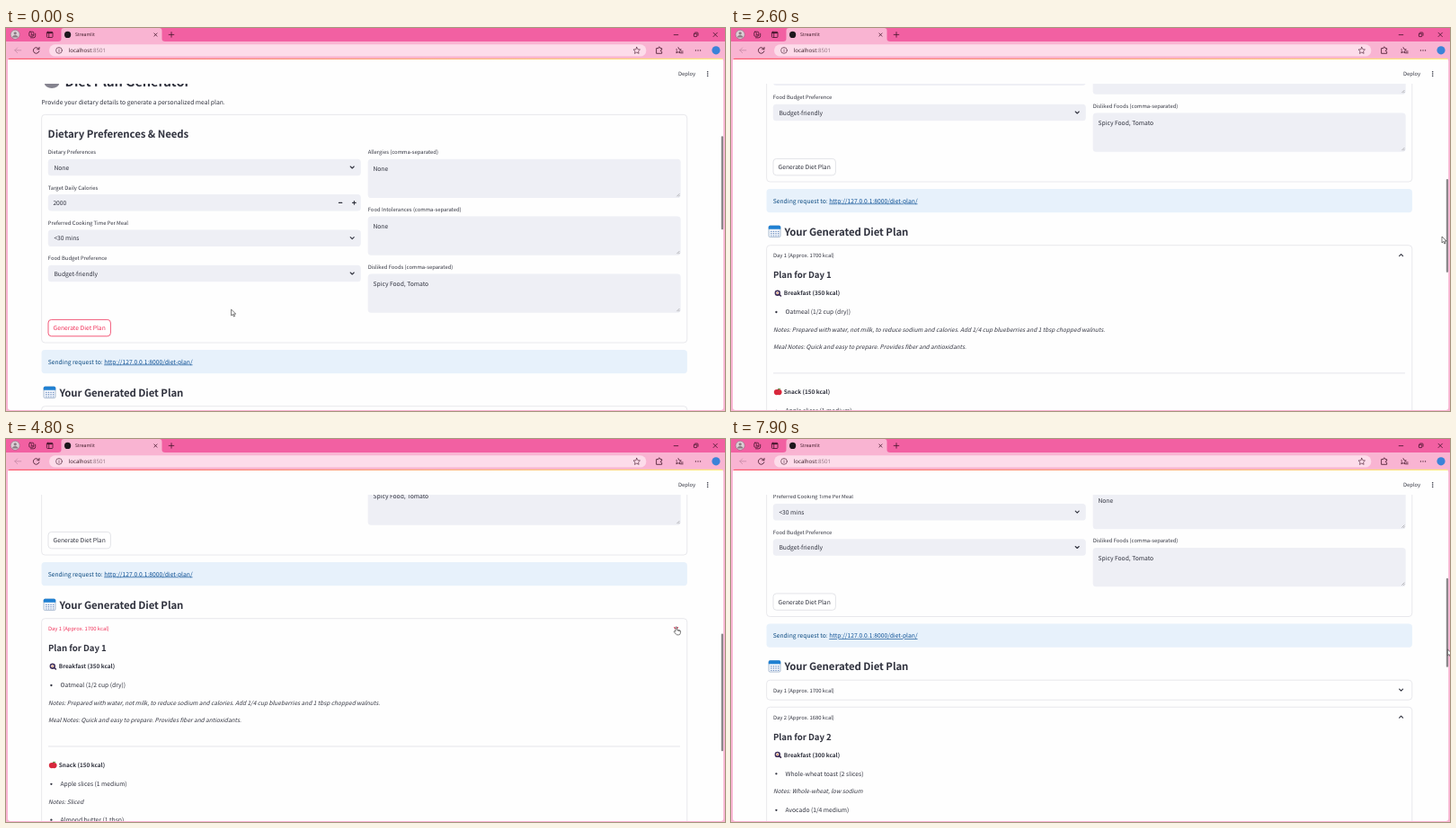
Animation of 800 by 426 pixels, one loop 8 s. Source, as an HTML page:

```html
<!DOCTYPE html>
<html lang="en">
<head>
<meta charset="utf-8">
<title>Diet plan</title>
<style>
html, body { margin: 0; width: 100%; height: 100%; overflow: hidden; background: #f9b4d2; }
svg { display: block; width: 800px; height: 426px; }
text { font: 6.72px "Noto Sans CJK JP", "Noto Sans CJK SC", "Noto Sans CJK KR", "Noto Sans CJK", "Noto Sans", sans-serif;
  fill: #31333f; text-rendering: geometricPrecision; white-space: pre; }
.small { font-size: 5.87px; }
.h2 { font-size: 14.6px; font-weight: 700; letter-spacing: -.08px; }
.h3 { font-size: 11.4px; font-weight: 700; letter-spacing: -.066px; }
.h4 { font-size: 9.65px; font-weight: 700; letter-spacing: -.05px; }
.strong { font-size: 6.45px; font-weight: 700; }
.note { font-size: 6.52px; font-style: italic; }
.info { fill: #0b4a80; }
.link { fill: #0b4f94; text-decoration: underline; }
.ui { font-family: "Open Sans", "Noto Sans", sans-serif; fill: #33121f; }
.line { fill: none; stroke: #31333f; stroke-width: 1.1; stroke-linecap: round; stroke-linejoin: round; }
.icon { fill: none; stroke: #42152a; stroke-width: .8; stroke-linecap: round; stroke-linejoin: round; }
.box { fill: none; stroke: #e2e3e8; stroke-width: .8; }
.field { fill: #eeeff5; }
.hot text.title { fill: #f0325a; }
.hot .line { stroke: #f0325a; }
</style>
</head>
<body>
<svg id="stage" viewBox="0 0 800 426"></svg>
<script>
const LOOP = 8000, STEP = 100;
const ACCENT = '#f0325a';
const BODY_1 = 602, BODY_2 = 676;              // heights of the two day panels when open
const VIEW_TOP = 34, VIEW_H = 391, PAGE_H = 868, ABOVE = 324.5;
const BOTTOM_SCROLL = PAGE_H - VIEW_H - ABOVE; // furthest scroll with all days closed

const text = (x, y, s, cls = '') => `<text x="${x}" y="${y}" class="${cls}">${s}</text>`;
const rect = (x, y, w, h, r, attrs) => `<rect x="${x}" y="${y}" width="${w}" height="${h}" rx="${r}" ${attrs}/>`;
const path = (d, attrs = 'class="icon"') => `<path d="${d}" ${attrs}/>`;
const circle = (x, y, r, attrs) => `<circle cx="${x}" cy="${y}" r="${r}" ${attrs}/>`;

const label = (x, mid, s) => text(x, mid + 2.2, s, 'small');
const field = (x, y, h) => rect(x, y, 348, h, 3.6, 'class="field"');
const chevron = (x, y) => path(`M${x - 2} ${y - 1}l2 2l2-2`, 'class="line"');

function select(mid, name, value) {
  return label(46.8, mid - 17, name) + field(46.8, mid - 9.3, 18.6) +
    text(53.4, mid + 2.6, value) + chevron(385.2, mid);
}

function area(top, name, value) {
  return label(402.7, top - 7.8, name) + field(402.7, top, 43.3) +
    text(408.4, top + 13.6, value) +
    path(`M746.4 ${top + 41.6}l3-3M748.2 ${top + 41.8}l1.4-1.4`, 'stroke="#777" stroke-width=".5"');
}

const calendar = `<g>
  ${rect(42, 399, 13, 12.6, 1.5, 'fill="#f1f5fb" stroke="#7f98b8" stroke-width=".6"')}
  ${path('M41.8 402.8v-2.3q0-1.7 1.7-1.7h10q1.7 0 1.7 1.7v2.3z', 'fill="#1f80d2"')}
  ${[404.8, 407.1, 409.4].map(y => [44.2, 46.8, 49.4, 52].map(x =>
    rect(x, y, 1.3, 1.2, .2, 'fill="#6f8fc0"')).join('')).join('')}</g>`;

const pan = y => path(`M53.2 ${y + .9}l2.2 2`, 'stroke="#3b2c4c" stroke-width="1.6" stroke-linecap="round"') +
  circle(51.8, y - .4, 3.2, 'fill="#40305a"') + circle(51.7, y - .5, 1.7, 'fill="#f3e9ee"') +
  circle(51.8, y - .4, .8, 'fill="#e8862c"');

const apple = y => circle(50.9, y + .4, 3.1, 'fill="#d8283c"') + circle(53.5, y + .4, 3.1, 'fill="#d8283c"') +
  path(`M52.2 ${y - 2}l.4-1.9`, 'stroke="#5b3524" stroke-width=".7"') +
  path(`M52.6 ${y - 2.6}q1-1.8 2.6-1.2q-.7 1.7-2.6 1.2z`, 'fill="#4f9a3c"');

const item = (y, s) => circle(50.4, y - 2.4, 1.15, 'fill="#31333f"') + text(60.5, y, s);

const bodies = {
  1: text(47, 36.4, 'Plan for Day 1', 'h4') + pan(53.4) + text(58.8, 55.7, 'Breakfast (350 kcal)', 'strong') +
    item(76.7, 'Oatmeal (1/2 cup (dry))') +
    text(47, 96.1, 'Notes: Prepared with water, not milk, to reduce sodium and calories. Add 1/4 cup blueberries and 1 tbsp chopped walnuts.', 'note') +
    text(47, 115.7, 'Meal Notes: Quick and easy to prepare. Provides fiber and antioxidants.', 'note') +
    path('M47 142.2H750', 'stroke="#dedfe4" stroke-width=".8"') +
    apple(163) + text(58.8, 165.6, 'Snack (150 kcal)', 'strong') +
    item(186.5, 'Apple slices (1 medium)') + text(47, 206, 'Notes: Sliced', 'note') +
    item(226.4, 'Almond butter (1 tbsp)'),
  2: text(47, 36.4, 'Plan for Day 2', 'h4') + pan(53.1) + text(58.8, 55.5, 'Breakfast (300 kcal)', 'strong') +
    item(76.5, 'Whole-wheat toast (2 slices)') +
    text(47, 96, 'Notes: Whole-wheat, low sodium', 'note') +
    item(117, 'Avocado (1/4 medium)'),
  3: ''
};

const day = (n, kcal) => `<g id="day${n}">
  <clipPath id="clip${n}"><rect id="shade${n}" x="39" width="720" height="22"/></clipPath>
  ${rect(39.6, 0, 718.2, 22, 3.7, `class="box" id="frame${n}"`)}
  ${text(47, 13.4, `Day ${n} (Approx. ${kcal} kcal)`, 'small title')}
  <g id="arrow${n}">${chevron(745.6, 11)}</g>
  <g clip-path="url(#clip${n})">${bodies[n]}</g></g>`;

const page = `
  <ellipse cx="51" cy="61" rx="8.3" ry="6" fill="#85838f"/>
  ${text(65.6, 65, 'Diet Plan Generator', 'h2')}
  ${text(39.4, 84.9, 'Provide your dietary details to generate a personalized meal plan.')}
  ${rect(39.6, 96.4, 718.2, 253.6, 3.7, 'class="box"')}
  ${text(46.6, 121.5, 'Dietary Preferences &amp; Needs', 'h3')}
  ${select(155, 'Dietary Preferences', 'None')}
  ${label(46.8, 177.4, 'Target Daily Calories')}${field(46.8, 185, 18.6)}${text(52.4, 196.8, '2000')}
  ${path('M370.4 194.4h3.4M385.6 194.4h3.6M387.4 192.6v3.6', 'class="line"')}
  ${select(233.7, 'Preferred Cooking Time Per Meal', '&lt;30 mins')}
  ${select(273, 'Food Budget Preference', 'Budget-friendly')}
  ${area(145.7, 'Allergies (comma-separated)', 'None')}
  ${area(209.5, 'Food Intolerances (comma-separated)', 'None')}
  ${area(273.5, 'Disliked Foods (comma-separated)', 'Spicy Food, Tomato')}
  ${rect(47, 324.4, 69.4, 18.4, 3.6, 'id="button" fill="#fff" stroke-width=".8"')}
  <text id="buttonText" x="52.6" y="336.2">Generate Diet Plan</text>
  ${rect(39.5, 358, 718.4, 26.2, 3.7, 'fill="#e7f1fb"')}
  <text x="46.8" y="373.5" class="info">Sending request to: <tspan class="link">http://127.0.0.1:8000/diet-plan/</tspan></text>
  ${calendar}
  ${text(59.4, 409.8, 'Your Generated Diet Plan', 'h3')}
  ${day(1, 1700)}${day(2, 1680)}${day(3, 1700)}`;

const browser = `
  ${rect(0, 0, 800, 16, 0, 'fill="#f260a2"')}
  ${rect(0, 15, 800, 411, 0, 'fill="#f9b4d2"')}
  ${path('M58 15q3.5 0 3.5-3V3q0-3 3-3h106q3 0 3 3v9q0 3 3.5 3z', 'fill="#f9b4d2"')}
  ${circle(10.2, 7.3, 5, 'fill="#dccfd6" stroke="#7d6672" stroke-width=".5"')}
  ${circle(10.2, 5.8, 1.6, 'fill="#8a7b83"')}${path('M7 10.6q0-2.7 3.2-2.7t3.2 2.7z', 'fill="#8a7b83"')}
  ${rect(25.8, 4.2, 5, 5, 1, 'class="icon"')}${path('M27.5 10.8h3.2q2 0 2-2V6.2M28.3 5.6v2.2h2')}
  ${rect(45.4, 4.3, 6.6, 6.2, 1, 'class="icon"')}${path('M45.6 5.3h6.2', 'stroke="#42152a" stroke-width="1.6"')}${path('M47.7 6v4.3')}
  ${circle(68.6, 7.4, 3.6, 'fill="#1d171c"')}
  <text class="ui" x="77" y="9.4" style="font-size:5.2px">Streamlit</text>
  ${path('M164.8 5.9l3.2 3.2M168 5.9l-3.2 3.2M181.2 7.4h5.6M184 4.6v5.6M743.2 7.6h4.6M787 5.2l4.4 4.4M791.4 5.2l-4.4 4.4')}
  ${rect(765.4, 6.2, 3.4, 3.4, .6, 'class="icon"')}${path('M766.8 5h2.4q.8 0 .8.8v2.4')}
  ${path('M16.8 24.8h-7M12.6 22l-2.8 2.8l2.8 2.8', 'class="icon" style="stroke:#c78aa5"')}
  ${path('M36.6 23.4a3.3 3.3 0 1 0 .3 2.4M37 21.4v2.3h-2.3')}
  ${rect(48, 18.2, 664.4, 13.4, 6.7, 'fill="#fddcea"')}
  ${circle(59, 24.9, 3.4, 'class="icon" style="stroke-width:.6"')}${path('M59 24.6v1.8M59 23.1v.1', 'class="icon" style="stroke-width:.6"')}
  <text class="ui" x="69.8" y="27.1" style="font-size:6.1px">localhost<tspan fill="#8d6b7b">:8501</tspan></text>
  ${path('M701.8 21.3l1.1 2.4l2.6.3l-1.9 1.8l.5 2.6l-2.3-1.3l-2.3 1.3l.5-2.6l-1.9-1.8l2.6-.3z', 'class="icon" style="stroke-width:.6"')}
  ${path('M724 22.6h1.9q-.1-1.6 1-1.6t1 1.6h1.8v1.7q-1.4 0-1.4 1t1.4 1v2H724z')}
  ${path('M748 21.6l1 2.1l2.3.3l-1.7 1.6l.3 2.2l-2-1.1l-2 1.1l.4-2.2M751.2 26h2M750.6 27.8h2.6M745.8 23.9h.8')}
  ${[767.4, 770, 772.6].map(x => circle(x, 24.9, .65, 'fill="#42152a"')).join('')}
  ${circle(790, 24.8, 4.6, 'fill="#3b83d8"')}
  ${rect(2, 34, 796.2, 391, 3, 'fill="#fefefe"')}`;

const header = `
  ${path('M2.4 35.1q.4-1.3 2-1.3h791.4q1.6 0 2 1.3z', 'fill="url(#band)"')}
  ${text(748, 53.1, 'Deploy', 'small')}
  ${[48.7, 51, 53.3].map(y => circle(780.7, y, .8, 'fill="#31333f"')).join('')}`;

const cursors = `
  <g id="pointer">${path('M0 0v6.9l1.7-1.5l1.1 2.6l1.2-.5l-1.1-2.5h2.2z', 'fill="#fff" stroke="#222" stroke-width=".6" stroke-linejoin="round"')}</g>
  <g id="hand">${path('M-.8 5.4V.8q0-.8.8-.8t.8.8v2.6l3 .6q1.1.3 1 1.4l-.4 2.2q-.2 1.4-1.6 1.4H1q-.8 0-1.4-.8l-2-2.4q-.4-.7.2-1q.7-.3 1.4.6zM2.2 3.8v1.4M3.5 4v1.3', 'fill="#fff" stroke="#222" stroke-width=".6" stroke-linejoin="round"')}</g>`;

document.getElementById('stage').innerHTML = `
  <defs>
    <linearGradient id="band"><stop offset="0" stop-color="#fd5a70"/><stop offset="1" stop-color="#fdeb80"/></linearGradient>
    <clipPath id="view"><rect x="2" y="62" width="794" height="363"/></clipPath>
  </defs>
  ${browser}
  <g clip-path="url(#view)"><g id="page">${page}</g></g>
  ${header}
  ${rect(795.8, 0, 2.3, 0, 1.1, 'id="thumb" fill="#8b888b"')}
  ${cursors}`;

const el = id => document.getElementById(id);
const set = (id, attrs) => { for (const k in attrs) el(id).setAttribute(k, attrs[k]); };
const move = (id, x, y) => set(id, { transform: `translate(${x} ${y})` });
const smooth = u => u * u * (3 - 2 * u);
const ramp = (t, a, b) => smooth(Math.min(1, Math.max(0, (t - a) / (b - a))));

// Each key is [time, ...values]; values ease from one key to the next.
function follow(keys, t) {
  let value = keys[0].slice(1);
  for (let i = 1; i < keys.length; i++) {
    const u = ramp(t, keys[i - 1][0], keys[i][0]);
    value = value.map((v, k) => v + (keys[i][k + 1] - keys[i - 1][k + 1]) * u);
  }
  return value;
}

const mouseKeys = [
  [0, 250.6, 313], [800, 250.6, 313], [2000, 797, 182], [2300, 797, 182], [2600, 791, 232],
  [2800, 791, 243], [3100, 791, 243], [3800, 745.8, 208.6], [5600, 745.8, 209],
  [6300, 744.8, 312], [7100, 744.8, 312], [7700, 797.4, 234]
];
const scrollKeys = [[2300, 0], [2600, 179], [2800, 221]];

function drawDay(n, y, body, open, hot) {
  move(`day${n}`, 0, y);
  set(`frame${n}`, { height: 22 + body });
  set(`shade${n}`, { height: 22 + body });
  set(`arrow${n}`, { transform: open ? 'rotate(180 745.6 11)' : '' });
  set(`day${n}`, { class: hot ? 'hot' : '' });
}

function draw(t) {
  const body1 = BODY_1 * (1 - ramp(t, 4600, 5000));
  const body2 = BODY_2 * ramp(t, 6700, 7100);
  const hot1 = t >= 3700 && t < 4900, hot2 = t >= 6200 && t < 7200;
  // Closing the first day pushes the page up; opening the second leaves it there.
  const scroll = Math.min(follow(scrollKeys, t)[0], BOTTOM_SCROLL + body1);
  const [x, y] = follow(mouseKeys, t);

  move('page', 0, -scroll);
  drawDay(1, 420.7, body1, t < 4600, hot1);
  drawDay(2, 450.7 + body1, body2, t >= 6600, hot2);
  drawDay(3, 480.7 + body1 + body2, 0, false, false);

  const focused = t < 2200;
  set('button', { stroke: focused ? ACCENT : '#dcdde2' });
  el('buttonText').style.fill = focused ? ACCENT : '#31333f';

  const ratio = VIEW_H / (PAGE_H + body1 + body2);
  set('thumb', { y: VIEW_TOP + (ABOVE + scroll) * ratio, height: VIEW_H * ratio });

  const pointing = hot1 || hot2;
  move('pointer', x, y);
  move('hand', x, y);
  set('pointer', { visibility: pointing ? 'hidden' : 'visible' });
  set('hand', { visibility: pointing ? 'visible' : 'hidden' });
}

const start = performance.now();
function tick() {
  const t = (performance.now() - start) % LOOP;
  draw(Math.floor(t / STEP) * STEP);
  requestAnimationFrame(tick);
}
tick();
</script>
</body>
</html>
```
